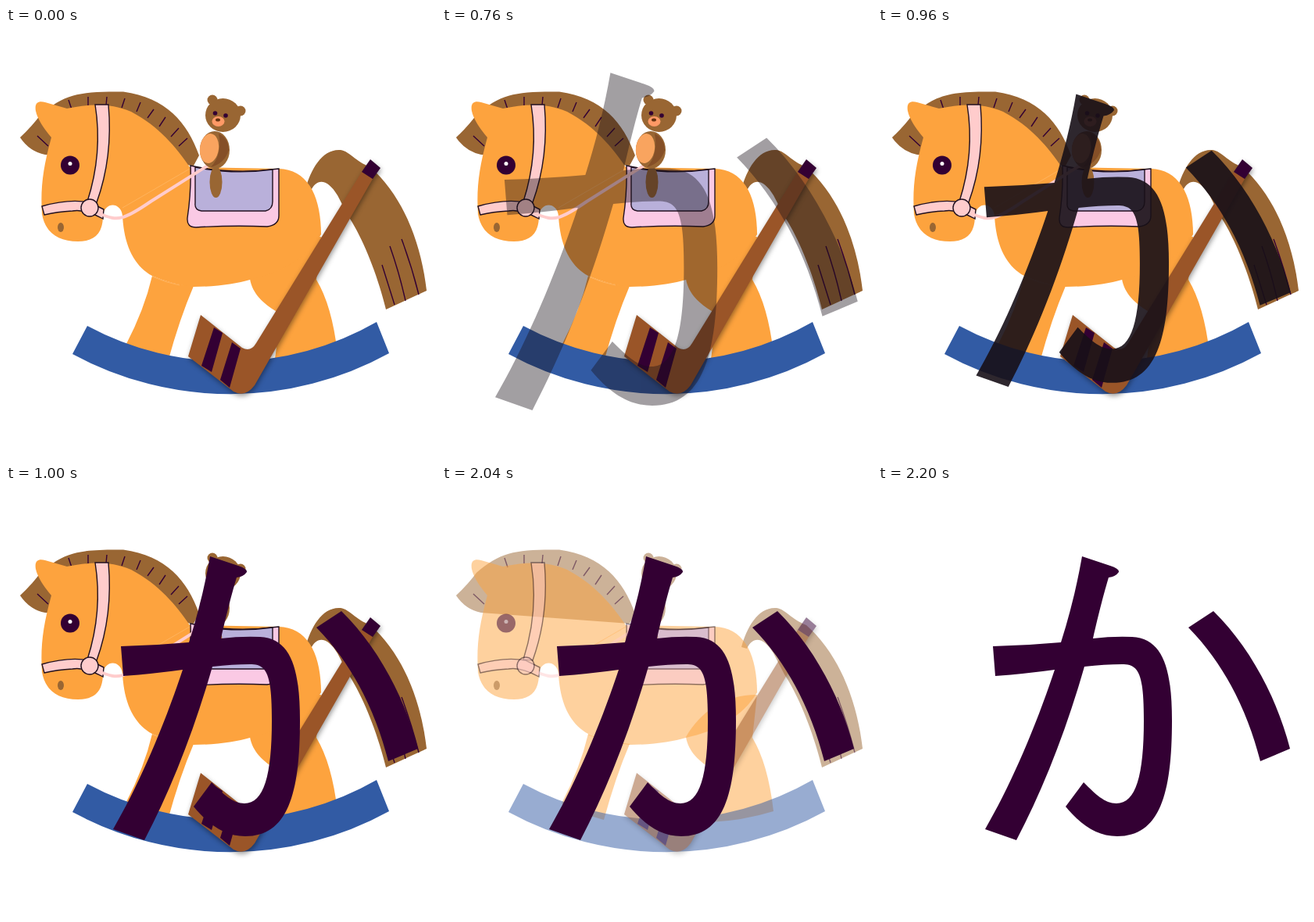
An HTML page that plays this animation: 550x550 px, repeating every 3000 ms.

```html
<!DOCTYPE html>
<html lang="ja">
<head>
<meta charset="utf-8">
<title>か – rocking horse</title>
<style>
  html, body { margin: 0; width: 100%; height: 100%; overflow: hidden; background: #fff; }
  svg { display: block; width: 100vw; height: 100vh; }
  /* Every piece fades on its own, so overlaps show through. */
  #horse > * { opacity: var(--fade, 1); }
  .coat { fill: #fda33e; }
  .brown { fill: #963; }
  .dark { fill: #303; }
  .wood { fill: #9a5528; }
  .pink { fill: #fcc; }
  .line { fill: none; stroke: #303; stroke-width: 1.4; }
  .edge { stroke: #201020; stroke-width: 1.4; }
  .stick { filter: drop-shadow(1px 3px 3px #0006); }
</style>
</head>
<body>
<svg viewBox="0 0 550 550">
  <g id="horse">
    <path class="brown" d="M18 140Q34 125 44 111C75 84 95 81 150 81.500C205 89 232 121 247 163L240 176 50 162Q30 158 18 140Z"/>
    <path class="line" d="M40 138l14 13M80 92l4 12M105 88v11M129 88l-1 11M152 90l-4 12M172 95l-5 12M189 104l-8 11M204 114l-8 12M221 128l-10 11M232 141l-11 10"/>
    <path class="brown" d="M383 206C390 180 405 154 428 156C440 158 446 170 466 178C508 215 531 275 538 336L486 360C475 315 456 268 438 241L424 214C411 192 397 192 390 208Z"/>
    <path class="line" d="M481 303l16 51M491 279Q503 313 511 349M506 270Q519 305 528 341"/>
    <path class="coat" d="M187 317Q177 360 153 406Q180 420 207 427Q222 372 240 330Q212 328 187 317Z"/>
    <path class="coat" d="M312 321C330 290 360 267 403 267L397 322Q417 355 424 416Q385 428 343 430Q349 396 345 362C330 353 315 340 312 321Z"/>
    <path class="coat" d="M38 106C36 94 43 93 50 95L78 103C105 98 130 95 160 107C196 126 218 153 235 178L349 180C386 181 403 215 403 264C385 295 350 314 312 322C295 327 270 331 240 331Q212 328 187 317C165 305 151 280 149 240C147 222 126 222 124 240C124 264 112 273 92 273C66 273 50 261 46 238C44 205 47 180 58 140Q41 120 38 106Z"/>
    <path fill="none" stroke="#ffb35c" d="M149 230L235 180M187 318Q205 326 222 329"/>
    <path fill="#325ba4" d="M85 417L104 381A381 381 0 0 0 474 376L490 416A422 422 0 0 1 85 417Z"/>

    <path class="edge" fill="#fac9e4" d="M236 176Q237 210 232 243Q231 255 243 255Q290 252 334 254Q349 252 349 240V180Q290 188 236 176Z"/>
    <path class="edge" fill="#b9b0da" d="M242 178V224Q241 233 250 234H332Q341 232 341 222V181Q290 188 242 178Z"/>

    <path class="pink edge" d="M114 98H131Q137 165 116 223L104 222Q124 160 114 98Z"/>
    <path class="pink edge" d="M46 228Q80 218 107 223L125 232 124 244Q100 231 85 234Q65 235 49 239Z"/>
    <circle class="pink edge" cx="107" cy="230" r="11"/>
    <path fill="none" stroke="#fcc" stroke-width="4" d="M121 238C143 247 150 246 185 222L258 176"/>
    <circle class="dark" cx="82" cy="175.500" r="12"/>
    <circle fill="#fff" cx="82" cy="173.500" r="2.500"/>
    <ellipse class="brown" cx="70" cy="255" rx="4" ry="6"/>

    <g>
      <g class="brown">
        <circle cx="264" cy="92" r="6.500"/>
        <circle cx="300" cy="106" r="6.500"/>
        <ellipse cx="277.500" cy="111.500" rx="22.500" ry="21.500"/>
        <ellipse cx="267" cy="156" rx="19" ry="24"/>
      </g>
      <ellipse fill="#f9a45f" cx="260" cy="154" rx="12" ry="19" transform="rotate(8 260 154)"/>
      <path fill="#854f27" d="M272 135Q284 140 285 156Q280 173 262 178Q277 162 272 135Z"/>
      <ellipse class="brown" cx="268.500" cy="197" rx="8" ry="20"/>
      <ellipse fill="#f96" cx="271.500" cy="119.500" rx="8" ry="6.500"/>
      <circle class="dark" cx="267.500" cy="109" r="2.800"/>
      <circle class="dark" cx="281" cy="112" r="2.800"/>
      <ellipse fill="#631" cx="271" cy="117.500" rx="3" ry="2"/>
    </g>

    <g class="stick">
      <path class="wood" d="M249 367L302 409Q313 415 320 403L455 184 469 193 318 457Q306 473 291 465L233 420Z"/>
      <path class="dark" d="M466 168L479 179 469 193 455 184ZM266 383L277 390 263 440 250 432ZM289 402L300 410 286 460 274 450Z"/>
    </g>
  </g>

  <g id="kana">
    <path d="M261 90L297 102Q309 106 308 110Q304 116 295 117C289 137 283 160 275 195Q300 192 325 193C365 195 376 235 376 300C376 395 360 448 306 448C280 448 260 434 240 410L263 379C278 394 290 406 305 406C330 406 340 370 340 300C340 238 333 228 312 228Q290 228 264 231C240 315 210 390 177 453L137 439C170 382 201 310 226 235Q190 240 150 243L147 205Q190 204 234 200C245 165 254 130 261 90Z"/>
    <path d="M429 160C475 205 510 270 527 336L489 352C473 290 445 230 397 181Z"/>
  </g>
</svg>
<script>
  const LOOP = 3000, STEP = 40;
  const horse = document.getElementById('horse');
  const kana = document.getElementById('kana');

  // Progress 0..1 in discrete steps; the first step lands at `start`.
  const progress = (time, start, steps) =>
    Math.max(0, Math.min(1, (Math.floor((time - start) / STEP) + 1) / steps));

  function draw(now) {
    const time = now % LOOP;
    const arrive = progress(time, 640, 10);
    const leave = progress(time, 1920, 8);
    const scale = 1 + 0.315 * (1 - arrive);

    kana.setAttribute('transform', `translate(502 263) scale(${scale}) translate(-502 -263)`);
    kana.style.opacity = arrive;
    kana.style.fill = arrive < 1 ? '#181018' : '#303';
    horse.style.setProperty('--fade', 1 - leave);
    requestAnimationFrame(draw);
  }
  draw(performance.now());
</script>
</body>
</html>
```
